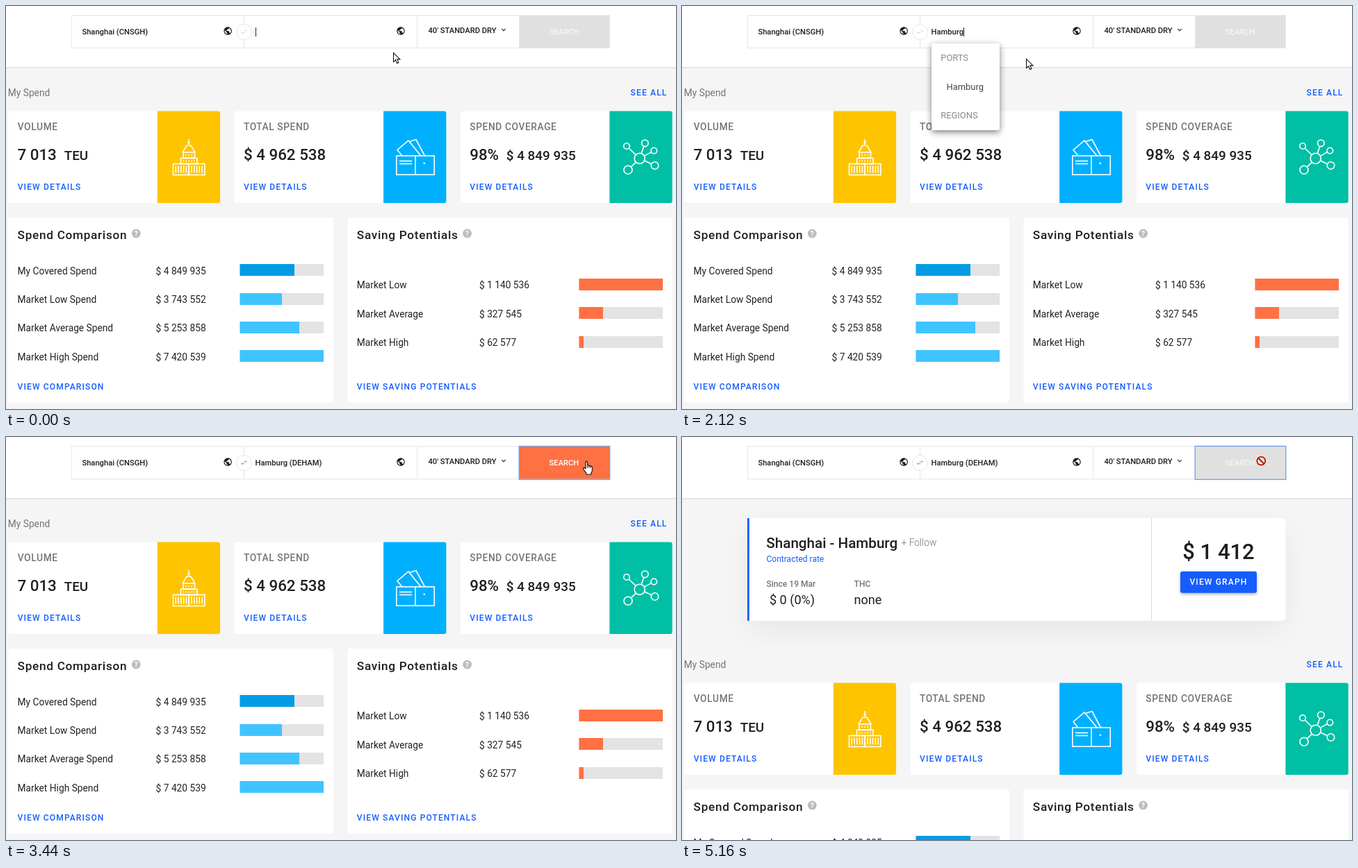
Write an HTML page with a canvas that moves like this. It is 964 px wide and 581 px high and loops after 6.52 s.

```html
<!DOCTYPE html>
<html lang="en">
<head>
<meta charset="utf-8">
<title>Freight rate search</title>
<style>
  html, body { margin: 0; width: 100%; height: 100%; overflow: hidden; background: #f5f5f5; }
  canvas { display: block; }
</style>
</head>
<body>
<canvas id="stage" width="964" height="581"></canvas>
<script>
const ctx = document.getElementById('stage').getContext('2d');
const LOOP = 6520, STEP = 40;
const BLUE = '#155dff', INK = '#1f1f1f', GREY = '#757575', ORANGE = '#ff7043';
const KEYS = [280, 480, 560, 720, 800, 880, 1040];

const GLOBE = new Path2D('M12 2C6.48 2 2 6.48 2 12s4.48 10 10 10 10-4.48 10-10S17.52 2 12 2zm-1 17.93c-3.95-.49-7-3.85-7-7.93 0-.62.08-1.21.21-1.79L9 15v1c0 1.1.9 2 2 2v1.93zm6.9-2.54c-.26-.81-1-1.39-1.9-1.39h-1v-3c0-.55-.45-1-1-1H8v-2h2c.55 0 1-.45 1-1V7h2c1.1 0 2-.9 2-2v-.41c2.93 1.19 5 4.06 5 7.41 0 2.08-.8 3.97-2.1 5.39z');
const SWAP = new Path2D('M7 11L3 15l4 4v-3h7v-2H7zM21 9l-4-4v3h-7v2h7v3z');
const ARROW = new Path2D('M.5.5V13.6L3.5 10.8 5.6 15.6 7.9 14.6 5.8 9.9H9.9Z');
const HAND = new Path2D('M4 1.6Q5.3-.4 6.5 1.6V6.4Q8 5.4 8.8 7 10.3 6 11.2 7.7 13 7 13.4 9V13.5Q13.2 16 11.8 17.5V19.5H5V17.6L.9 12.2Q-.2 10 2 9.7L4 11.4Z');

const clamp = v => Math.max(0, Math.min(1, v));
const ramp = (t, a, b) => clamp((t - a) / (b - a));
const lerp = (a, b, u) => a + (b - a) * u;

function text(str, x, y, size, color, weight = 400, gap = 0) {
  ctx.font = `${weight} ${size}px Roboto, sans-serif`;
  ctx.letterSpacing = gap + 'px';
  ctx.fillStyle = color;
  ctx.fillText(str, x, Math.round(y));
  return x + ctx.measureText(str).width;
}

function rect(x, y, w, h, color, radius = 0) {
  ctx.fillStyle = color;
  ctx.beginPath();
  ctx.roundRect(x, y, w, h, radius);
  ctx.fill();
}

function line(points, close) {
  ctx.beginPath();
  for (let i = 0; i < points.length; i += 2) ctx.lineTo(points[i], points[i + 1]);
  if (close) ctx.closePath();
  ctx.stroke();
}

function ring(x, y, r) {
  ctx.beginPath();
  ctx.arc(x, y, r, 0, 2 * Math.PI);
  ctx.stroke();
}

function icon(path, x, y, scale, color) {
  ctx.save();
  ctx.translate(x, y);
  ctx.scale(scale, scale);
  ctx.fillStyle = color;
  ctx.fill(path);
  ctx.restore();
}

function shadow(color, blur, dy) {
  ctx.shadowColor = color;
  ctx.shadowBlur = blur;
  ctx.shadowOffsetY = dy;
}
const noShadow = () => shadow('transparent', 0, 0);
const link = (str, x, y) => text(str, x, y, 12.04, BLUE, 500, 1.13);

function pen(color, width) {
  ctx.strokeStyle = color;
  ctx.lineWidth = width;
}

function header(t) {
  rect(0, 0, 964, 88, '#fff');
  rect(0, 88, 964, 1.5, '#e0e0e0');
  pen('#e6e6e6', 1);
  ctx.strokeRect(94.5, 13.5, 774, 47);
  for (const x of [342.5, 591.5, 738.5]) line([x, 14, x, 61]);

  text('Shanghai (CNSGH)', 109.4, 41, 11.18, INK, 500);
  const typed = 'Hamburg'.slice(0, KEYS.filter(k => t >= k).length);
  const end = text(t >= 2840 ? 'Hamburg (DEHAM)' : typed, 358.6, 41, 11.18, INK, 500);
  if (t < 1480 || (t >= 1800 && t < 2320)) rect(Math.round(end), 31, 1, 13, '#222');
  icon(GLOBE, 312.3, 29.2, .573, '#1c1c1c');
  icon(GLOBE, 561.1, 29.2, .573, '#1c1c1c');

  const ready = ramp(t, 2440, 2600);
  rect(331.5, 26.5, 22, 22, '#fff', 11);
  ring(342.5, 37.5, 11);
  icon(SWAP, 336.7, 31.3, .48, `rgba(125,125,125,${lerp(.25, .75, ready)})`);

  text('40′ STANDARD DRY', 607.5, 39, 11.18, INK, 500);
  pen('#333', 1.1);
  line([713.3, 33, 716, 35.7, 718.7, 33]);

  const off = t >= 3520;
  rect(739, 14, 129, 46.5, '#e0e0e0');
  if (!off && ready) {
    ctx.globalAlpha = ready;
    rect(739, 14, 129, 46.5, ORANGE);
    ctx.globalAlpha = 1;
  }
  text('SEARCH', 781.6, 41, 11.18, off || !ready ? '#f5f5f5' : '#fff', 500);
  if (t >= 3400) {
    pen('#7da5ee', 1.5);
    ctx.strokeRect(738.25, 13.25, 130.5, 48);
  }
}

function crane() {
  line([263, 192, 263, 200]);
  line([254, 211, 260, 201, 266, 201, 272, 211]);
  line([261, 197, 265, 197]);
  const crate = (x, y, w, h, n) => {
    ctx.strokeRect(x, y, w, h);
    for (let i = 1; i <= n; i++) line([x + i * w / (n + 1), y + 3, x + i * w / (n + 1), y + h - 3]);
  };
  crate(255, 211, 16.5, 8, 3);
  crate(251.5, 219.5, 23.5, 8, 5);
  crate(240.5, 227.5, 22.7, 16, 5);
  crate(263.2, 227.5, 22.7, 16, 5);
}

function wallet() {
  ctx.strokeRect(561.8, 216, 54.4, 27.2);
  line([589, 216, 589, 243]);
  line([566, 223.5, 584, 223.5]);
  line([566, 227.5, 584, 227.5]);
  line([570, 216, 563, 207.5, 579, 194, 597, 216]);
  line([580.5, 195.5, 590, 192.5, 602.5, 216]);
  rect(600.5, 225.5, 2.6, 2.6, '#fff', 1.3);
}

function network() {
  const nodes = [[893, 202, 4.3], [919.3, 197.8, 4.8], [932.3, 208.6, 4.3], [933.5, 230, 5.3], [895, 236.3, 6]];
  ring(911.7, 219.8, 7.6);
  for (const [x, y, r] of nodes) {
    const dx = x - 911.7, dy = y - 219.8, d = Math.hypot(dx, dy);
    ring(x, y, r);
    line([911.7 + dx / d * 7.6, 219.8 + dy / d * 7.6, x - dx / d * r, y - dy / d * r]);
  }
}

function tile(i, title, color, draw) {
  const x = 3.3 + i * 325.3;
  rect(x, 151.5, 304.8, 132.5, '#fff', 3);
  rect(x + 214.5, 151.5, 90.3, 132.5, color, [0, 3, 3, 0]);
  text(title, x + 13.4, 179, 13.76, GREY, 500, .6);
  link('VIEW DETAILS', x + 13.4, 265);
  pen('#fff', 1.6);
  draw();
}

function bars(rows, x, y, valueX, barX) {
  rows.forEach(([label, value, part, color], i) => {
    const dy = i * 41.3;
    text(label, x, y + dy, 13.76, '#222');
    text(value, valueX, y + dy, 13.76, '#222');
    const top = Math.round(y + dy - 14.3);
    rect(barX, top, 120.5, 17, '#e3e3e3');
    rect(barX, top, part, 17, color);
  });
}

function panel(x, title, helpX, footer) {
  rect(x, 305, 467.5, 266.5, '#fff', 3);
  text(title, x + 13.3, 336, 17.2, INK, 500, .7);
  rect(helpX - 6.4, 321.6, 12.8, 12.8, '#bdbdbd', 6.4);
  text('?', helpX - 2.5, 332, 10, '#fff', 700);
  link(footer, x + 13.3, 553);
}

function dashboard(dy) {
  ctx.save();
  ctx.translate(0, dy);
  text('My Spend', 2.8, 130, 13.76, GREY);
  link('SEE ALL', 898.6, 129);

  tile(0, 'VOLUME', '#ffc400', crane);
  text('7 013', 16.4, 222, 22.36, INK, 500);
  text('TEU', 83.7, 222, 18.92, INK, 500);
  tile(1, 'TOTAL SPEND', '#00b0ff', wallet);
  text('$ 4 962 538', 341.9, 222, 22.36, INK, 500);
  tile(2, 'SPEND COVERAGE', '#00bfa5', network);
  text('98%', 667.2, 222, 22.36, INK, 500);
  text('$ 4 849 935', 719.7, 222, 18.92, INK, 500);

  panel(3.3, 'Spend Comparison', 187.3, 'VIEW COMPARISON');
  bars([
    ['My Covered Spend', '$ 4 849 935', 78.5, '#039be5'],
    ['Market Low Spend', '$ 3 743 552', 60.5, '#40c4ff'],
    ['Market Average Spend', '$ 5 253 858', 85.5, '#40c4ff'],
    ['Market High Spend', '$ 7 420 539', 120.5, '#40c4ff']
  ], 16.6, 386.6, 215.6, 336.5);
  panel(491.5, 'Saving Potentials', 663.6, 'VIEW SAVING POTENTIALS');
  bars([
    ['Market Low', '$ 1 140 536', 120.5, ORANGE],
    ['Market Average', '$ 327 545', 34.5, ORANGE],
    ['Market High', '$ 62 577', 6.5, ORANGE]
  ], 504.8, 407.3, 681, 824.5);
  ctx.restore();
}

function rateCard(y, h, buttonY) {
  shadow('rgba(0,0,0,.06)', 40, 14);
  rect(94, y, 774.5, h, '#fff', [0, 5, 5, 0]);
  noShadow();
  rect(94, y, 2.8, h, BLUE);
  rect(675, y, 1, h, '#d8d8d8');
  shadow('rgba(0,0,0,.3)', 4, 2);
  rect(717, buttonY, 110, 31, BLUE, 3);
  noShadow();
  text('VIEW GRAPH', 730.4, buttonY + 19, 12.04, '#fff', 500, 1.15);
}

function loading(t) {
  ctx.globalAlpha = .2 * ramp(t, 3880, 4360);
  rateCard(174, 136, 247);
  for (const [x, y, w] of [[126, 209, 12], [148.5, 211, 5], [164, 209, 12], [763, 212.5, 18]]) rect(x, y, w, 1.6, INK);
  pen('#b32414', 1.3);
  ring(193.3, 210, 6);
  line([193.3, 206.5, 193.3, 211]);
  line([193.3, 212.2, 193.3, 213.5]);
  text('+ Follow', 206, 215, 13.76, GREY, 300);
  text('Contracted rate', 121.5, 240, 12.04, BLUE);
  text('Since 19 Mar', 121.5, 276, 12.04, GREY, 500);

  ctx.globalAlpha = .2 * ramp(t, 4480, 4680);
  const x = text('There is no rate data available today for to . You can still view historical data by clicking ', 93.6, 150, 13.76, GREY);
  text('.', text('View Graph', x, 150, 13.76, GREY, 500), 150, 13.76, GREY);

  // the pulse rests between the two fades
  const clock = t < 4520 ? Math.min(t, 4360) : t - 160;
  for (let i = 0; i < 3; i++) {
    const wave = .5 + .5 * Math.cos((clock - 4560) / 800 * 2 * Math.PI + (i - 1) * 2 * Math.PI / 3);
    ctx.globalAlpha = lerp(.28, .04, wave) * ramp(t, 3880, 4000);
    rect(465.3 + i * 12.2, 221, 6.4, 6.4, '#222');
  }
  ctx.globalAlpha = 1;
}

function result(t) {
  ctx.globalAlpha = lerp(.2, 1, ramp(t, 4720, 5160));
  rateCard(117, 148, 193.7);
  text('Shanghai - Hamburg', 121.3, 160, 20.64, INK, 500);
  text('+ Follow', 315.6, 157, 13.76, GREY, 300);
  text('Contracted rate', 121.5, 180, 12.04, BLUE);
  text('Since 19 Mar', 121.5, 216, 12.04, GREY, 500);
  text('THC', 247.6, 216, 12.04, GREY, 500);
  text('$ 0 (0%)', 126, 241, 18.06, INK);
  text('none', 247.5, 241, 18.06, INK);
  text('$ 1 412', 720.3, 176, 30.96, INK, 500);
  ctx.globalAlpha = 1;
}

function dropdown(t) {
  const alpha = ramp(t, 1880, 2040) * (1 - ramp(t, 2800, 2960));
  if (!alpha) return;
  ctx.globalAlpha = alpha;
  shadow('rgba(0,0,0,.5)', 10, 3);
  rect(359, 54, 98, 125, '#fff', 2);
  noShadow();
  if (t >= 2240) rect(359, 95.5, 98, 41.3, '#eee');
  text('PORTS', 372.3, 79, 12.9, '#8a8a8a');
  text('Hamburg', 380.6, 121, 12.9, '#444');
  text('REGIONS', 372.3, 162, 12.9, '#8a8a8a');
  ctx.globalAlpha = 1;
}

function pointer(t) {
  if (t >= 3520) {
    pen('rgba(255,255,255,.9)', 3.6);
    ring(833.3, 34.5, 6);
    pen('#b0200f', 2);
    ring(833.3, 34.5, 6);
    line([829.1, 30.3, 837.5, 38.7]);
    return;
  }
  const a = ramp(t, 1760, 2440), b = ramp(t, 2800, 3320);
  const ease = b * b * (3 - 2 * b);
  const x = lerp(lerp(557, 440, a), 835, ease);
  const y = lerp(67 + 32 * a * a, 34.5, ease);
  const hand = x > 739 || (t >= 2240 && x < 457);
  const shape = hand ? HAND : ARROW;
  ctx.save();
  ctx.translate(hand ? x - 5 : x, y);
  ctx.fillStyle = '#fff';
  ctx.fill(shape);
  pen('#111', 1.1);
  ctx.stroke(shape);
  if (hand) for (const k of [6.5, 8.8, 11.2]) line([k, 7, k, 10]);
  ctx.restore();
}

function draw(now) {
  const t = Math.floor(now % LOOP / STEP) * STEP;
  const loaded = t >= 4760;
  rect(0, 0, 964, 581, '#f5f5f5');
  if (loaded) result(t);
  else if (t >= 3920) loading(t);
  dashboard(loaded ? 203 : t >= 3520 ? 248 : 0);
  header(t);
  dropdown(t);
  pointer(t);
}

const start = performance.now();
function tick() {
  draw(performance.now() - start);
  requestAnimationFrame(tick);
}
tick();
</script>
</body>
</html>
```
